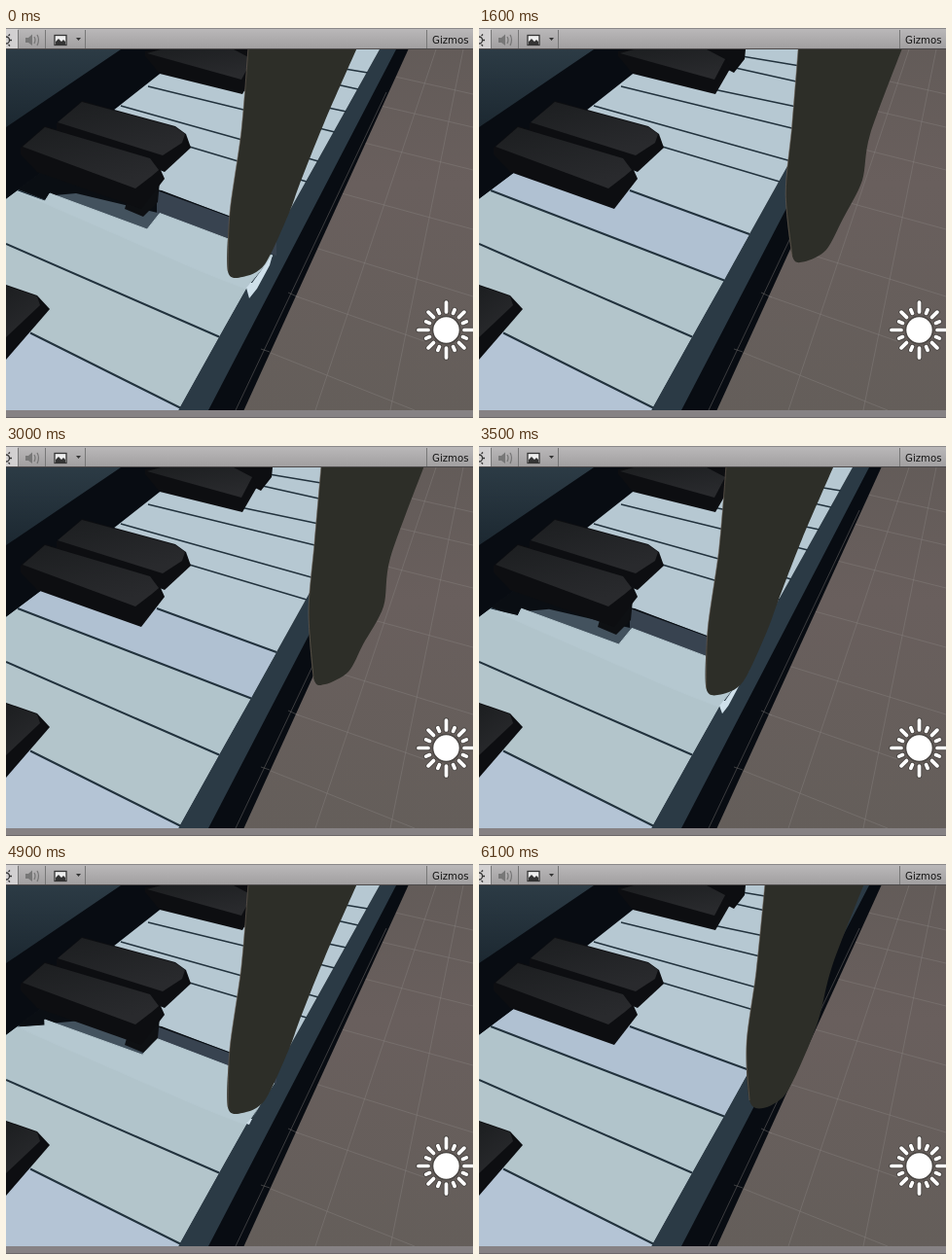
Write an HTML page that moves like this. It is 480 px wide and 401 px high and loops after 6200 ms.

```html
<!DOCTYPE html>
<html lang="en">
<head>
<meta charset="utf-8">
<title>Finger on piano keys</title>
<style>
  html, body { margin: 0; width: 100%; height: 100%; overflow: hidden; background: #655f5c; }
  svg { display: block; width: 100vw; height: 100vh; }
  .line { fill: none; stroke: #22323d; stroke-width: 2; }
  .thin { stroke-width: 1.4; }
  .grid { fill: none; stroke: #8b8582; stroke-width: 1; opacity: .4; }
  .sep { stroke: #777; stroke-width: 1; }
</style>
</head>
<body>
<svg viewBox="0 0 480 401" preserveAspectRatio="none">
  <defs>
    <linearGradient id="bar" x2="0" y2="1">
      <stop stop-color="#bbb9ba"/><stop offset="1" stop-color="#a09e9f"/>
    </linearGradient>
    <linearGradient id="floor" x2="0" y2="1">
      <stop stop-color="#625b58"/><stop offset=".4" stop-color="#695f5d"/><stop offset="1" stop-color="#645e5a"/>
    </linearGradient>
    <linearGradient id="ebony" x2=".5" y2="1">
      <stop stop-color="#1c1e20"/><stop offset="1" stop-color="#292a2d"/>
    </linearGradient>
    <linearGradient id="slate" x2="0" y2="1">
      <stop stop-color="#2c3b45"/><stop offset="1" stop-color="#1c2831"/>
    </linearGradient>
    <radialGradient id="shine"><stop stop-color="#85807a"/><stop offset="1" stop-color="#85807a" stop-opacity="0"/></radialGradient>
  </defs>

  <!-- floor -->
  <rect width="480" height="401" fill="url(#floor)"/>
  <path class="grid" d="M442 22L318 393M470 22L395 393M400 50L480 68M385 80L480 102M368 118L480 146M345 170L480 207M318 226L480 276M290 273L430 322M262 330L420 393"/>

  <!-- piano body and keys -->
  <path fill="#080c12" d="M0 22H413.500L244.500 393H0Z"/>
  <path fill="url(#slate)" d="M0 22H118L0 102Z"/>
  <path fill="#2b3a45" d="M384 22H401L208 393H177Z"/>
  <path class="grid" d="M391 66L236 393M290 272L301 277M262 330L271 333"/>
  <path fill="#b6c8d2" d="M162 44L270 22H384L177 393H0V176L36 149L110 85Z"/>
  <path fill="#b0c1d2" d="M36 149L160 168L278 212L252 259L12 167Z"/>
  <path fill="#b1c4cb" d="M12 167L252 259L219 317L0 222V176Z"/>
  <path fill="#b3c5cb" d="M0 222L219 317L178 391L28 314L0 300Z"/>
  <path fill="#b4c4d5" d="M0 301L179 390L177 393H0Z"/>
  <path class="line" d="M25 313.500L179 390.500M0 222L219 317.500M12 167L252 259.500M155 167L278 212"/>
  <path class="line thin" d="M185 121L309 158M118 80L321 137M146 60L338 107M165 47L350 86M250 38L362 63M270 29L372 46"/>
  <g id="press">
    <path fill="#0a0e13" d="M12 166L36 148L160 167L278 212L252 259Z"/>
    <path id="wall" fill="#384350"/>
    <path id="under" fill="#43525e"/>
    <path id="top" fill="#b5c8d0" stroke="#b5c8d0"/>
    <path id="lip" fill="#cfe0ea"/>
    <path fill="#0e1013" d="M125 176L158 158L156 179L141 194L122 186Z"/>
  </g>
  <g fill="#0d0e11">
    <path d="M228 22H274L273 32L262 46L250 40Z"/>
    <path d="M143 24L163 20H232L254 32L258 42L243 68L158 47L143 29Z"/>
    <path d="M52 98L78 75L174 101L185 109L190 123L163 148L52 106Z"/>
    <path d="M15 123L40 101L150 134L159 146L163 155L139 186L32 148L15 130Z"/>
    <path d="M0 264L32 275L45 289L0 341Z"/>
  </g>
  <g fill="url(#ebony)">
    <path d="M145 26L163 21H232L253 32L242 53Z"/>
    <path d="M53 97L78 76L174 102L184 109L181 118L161 131Z"/>
    <path d="M17 122L40 102L148 134L157 146L150 152L133 165Z"/>
    <path d="M0 265L32 276L35 285L0 318Z"/>
  </g>

  <!-- finger -->
  <path id="finger" fill="#2d2e28"/>
  <path id="rim" fill="none" stroke="#75695e" opacity=".55"/>
  <ellipse id="knuckle" cy="29" rx="11" ry="12" fill="url(#shine)"/>

  <!-- light marker -->
  <g id="sun" stroke-linecap="round"></g>

  <!-- window bars -->
  <rect width="480" height="22" fill="url(#bar)"/>
  <rect width="12" height="21" fill="#d2d0d1"/>
  <path stroke="#4c494a" d="M0 21.500H480"/>
  <path stroke="#8a8889" d="M0 .5H480"/>
  <path class="sep" d="M12.500 2V21M40.500 2V21M81.500 2V21M432.500 2V21"/>
  <g stroke="#343434" stroke-width="1.3" fill="none">
    <path d="M0 9A3.500 3.500 0 0 1 0 16M4 12.500H6M2.500 8L4 6.500M2.500 17L4 18.500"/>
    <path stroke="#777" d="M29 9Q31 12 29 16M32 7Q35 12 32 18"/>
    <rect x="50" y="7.500" width="12" height="10" fill="#eee"/>
  </g>
  <path fill="#777" d="M20 10H23L27 6.500V18L23 15H20Z"/>
  <path fill="#343434" d="M51 17V14L54 11L57 14L59 12L61 14V17ZM72 10H77L74.500 13Z"/>
  <text x="438" y="16" font-family="'DejaVu Sans', sans-serif" font-size="10.200" fill="#151515">Gizmos</text>
  <rect y="393" width="480" height="8" fill="#868284"/>
  <path stroke="#6b6769" d="M0 400.500H480"/>
</svg>
<script>
const LOOP = 6200, STEP = 100, SWING = 440;
const el = id => document.getElementById(id);
const mix = (a, b, p) => a + (b - a) * p;

// Outlines run down the left side, round the tip and up the right side.
const strike = [249,20, 242,105, 230,190, 228,250, 243,256, 266,243, 291,190, 302,160, 328,95, 361,20];
const lean = [274,20, 254,105, 234,190, 228,249, 244,256, 268,242, 290,207, 304,176, 350,92, 396,20];
const lift = [287,20, 264,120, 247,195, 245,247, 258,252, 285,243, 305,211, 321,170, 358,105, 415,20];
const away = [332,20, 326,100, 319,170, 327,230, 340,236, 361,225, 380,190, 399,150, 408,105, 440,20];
const back = [324,20, 317,100, 311,170, 316,238, 328,245, 352,232, 367,204, 388,165, 395,115, 430,20];
const near = [294,20, 285,110, 275,185, 278,243, 292,251, 314,238, 332,203, 349,160, 363,105, 396,20];

// [ms, outline, key depth]
const moves = [
  [0, strike, 1], [60, strike, .6], [120, lean, 1], [140, lift, 0],
  [250, away, 0], [360, back, 0], [380, near, 0], [SWING, strike, 1]
];

function poseAt(ms) {
  const i = moves.findIndex(m => m[0] > ms);
  const [t0, a, d0] = moves[i - 1], [t1, b, d1] = moves[i];
  const p = (ms - t0) / (t1 - t0), q = 1 - (1 - p) ** 2;
  return { shape: a.map((v, k) => mix(v, b[k], q)), depth: mix(d0, d1, q) };
}

const poly = pts => 'M' + pts.map(p => p.join(' ')).join('L') + 'Z';

function curve(flat, count) {
  const pts = [];
  for (let i = 0; i < count; i++) pts.push([flat[2 * i], flat[2 * i + 1]]);
  const at = i => pts[Math.max(0, Math.min(count - 1, i))];
  let d = 'M' + pts[0];
  for (let i = 0; i < count - 1; i++) {
    const [a, b, c, e] = [at(i - 1), at(i), at(i + 1), at(i + 2)];
    const c1 = b.map((v, k) => v + (c[k] - a[k]) / 7);
    const c2 = c.map((v, k) => v - (e[k] - b[k]) / 7);
    d += `C${c1} ${c2} ${c}`;
  }
  return d;
}

function drawKey(d) {
  el('press').style.display = d > .02 ? '' : 'none';
  const drop = 21 * d, k = Math.max(0, (d - .6) / .4);
  const corner = [133 + 12 * d, 180 + 27 * d], notch = [150.5 + 7.5 * d, 163 + 27.5 * d];
  el('wall').setAttribute('d', poly([[155, 167], [278, 212], [278, 213 + drop], [155, 169 + drop]]));
  el('under').setAttribute('d', poly([[72, 149 + drop], notch, corner, [50, 151 + drop]]));
  el('top').setAttribute('d', poly([
    [12, 168], [40, 178 - 12 * (1 - k)], [32 + 13 * d, 145 + 25 * d], corner, notch,
    [278 - 4 * d, 213 + drop], [252, 261], [246, 268], [200, 250]
  ]));
  el('lip').setAttribute('d', poly([
    [251, 262], [247, 267], [250, 268 + 10 * k], [252 + 6 * k, 264 + 4 * k],
    [266 + 5 * k, 238 + 6 * k], [270 + 4 * k, 233], [253, 262]
  ]));
}

function drawSun() {
  let rays = '';
  for (let i = 0; i < 16; i++) {
    const a = i * Math.PI / 8, r = i % 4 ? (i % 2 ? 22.5 : 26) : 28.5;
    const at = n => `${452.5 + n * Math.cos(a)} ${310.5 + n * Math.sin(a)}`;
    rays += `M${at(18.5)}L${at(r)}`;
  }
  const layer = (color, width, r) =>
    `<path d="${rays}" stroke="${color}" stroke-width="${width}"/><circle cx="452.5" cy="310.5" r="${r}" fill="${color}"/>`;
  el('sun').innerHTML = layer('#4a4643', 5.6, 14.8) + layer('#fff', 3.7, 13.2);
}

function draw(now) {
  const t = Math.floor(now % LOOP / STEP) * STEP, ms = t % SWING;
  const { shape, depth } = poseAt(ms);
  drawKey(depth);
  el('finger').setAttribute('d', curve(shape, 10) + 'Z');
  el('rim').setAttribute('d', curve(shape, 4));
  el('knuckle').setAttribute('cx', shape[0] + 6);
  el('knuckle').setAttribute('opacity', Math.max(0, 1 - Math.abs(ms - 115) / 22));
}

drawSun();
draw(0);
const start = performance.now();
(function tick() {
  draw(performance.now() - start);
  requestAnimationFrame(tick);
})();
</script>
</body>
</html>
```
